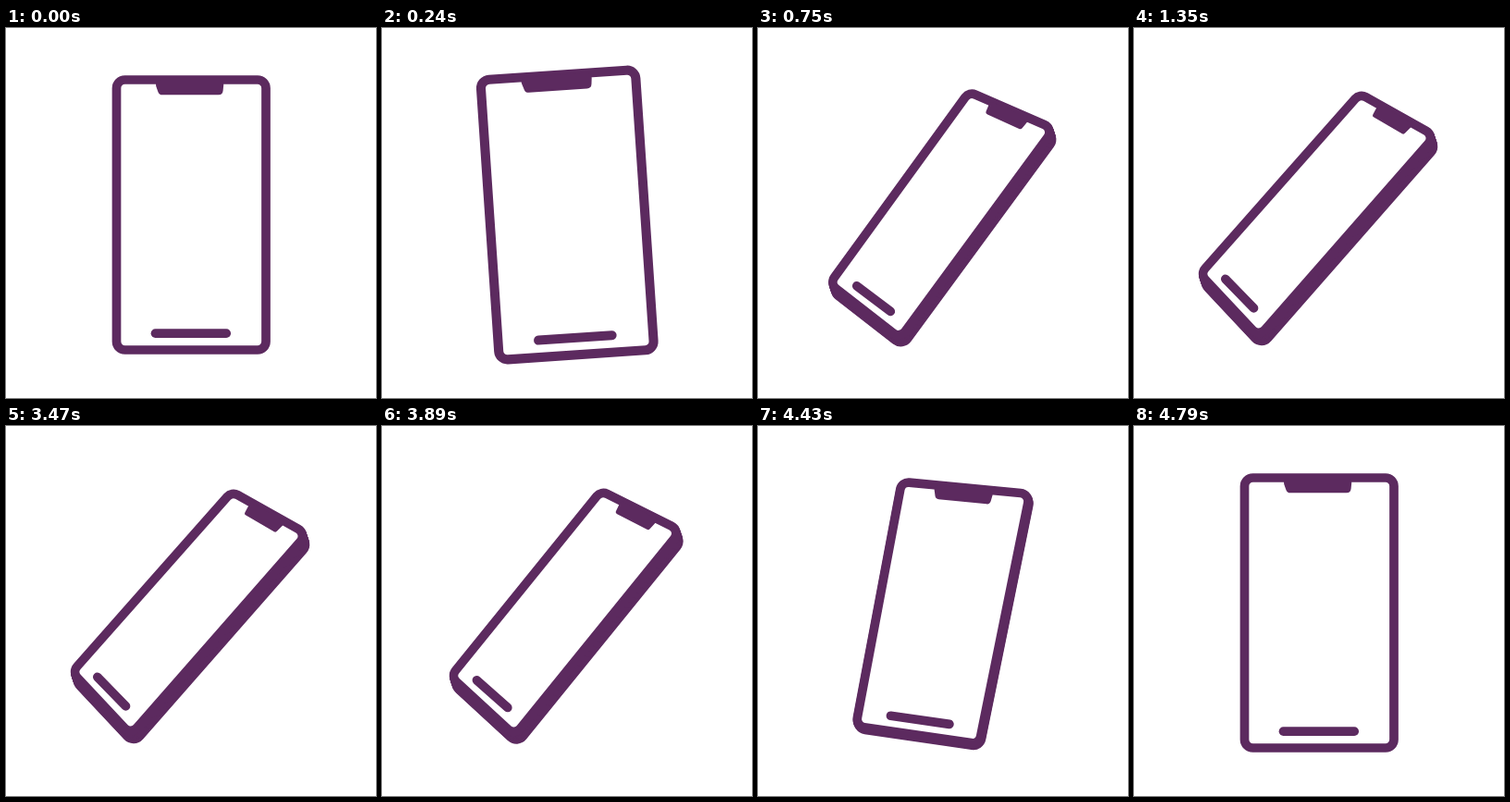
Write an HTML page with a canvas that moves like this. It is 400 by 400 pixels and loops after 5.82 s.

```html
<!DOCTYPE html>
<html lang="en">
<head>
<meta charset="utf-8">
<title>Tilting phone</title>
<style>
  html, body { margin: 0; width: 100%; height: 100%; overflow: hidden; background: #fff; }
  canvas { display: block; }
</style>
</head>
<body>
<canvas id="stage" width="400" height="400"></canvas>
<script>
const ctx = document.getElementById('stage').getContext('2d');
const PURPLE = '#5c2a5f';
const LOOP = 5820, TURN = 1350, BACK = 3440, STEP = 30;
const WINDUP = 150, SETTLE = 1290, DIP = 0.15;
const DEPTH = { x: 3, y: 9 };

// Upright body box, and where its corners go when fully tilted.
const body = { x: 119.5, y: 56, w: 161.5, h: 292 };
const tilted = [[244, 71], [325.5, 116.7], [135, 333.7], [71.5, 266]];

const lerp = (a, b, k) => a + (b - a) * k;
const mix = (p, q, k) => [lerp(p[0], q[0], k), lerp(p[1], q[1], k)];
const smooth = s => s * s * (3 - 2 * s);

// Maps u across and v down the screen face to the stage, for a tilt of 0 to 1.
function place(u, v, tilt) {
  const [a, b, c, d] = tilted;
  const end = mix(mix(a, b, u), mix(d, c, u), v);
  return mix([body.x + u * body.w, body.y + v * body.h], end, tilt);
}

// Cubic bezier easing (.26, 0, 0, 1), solved by bisection.
function ease(u) {
  let lo = 0, hi = 1;
  for (let i = 0; i < 24; i++) {
    const s = (lo + hi) / 2;
    if (0.78 * s * (1 - s) ** 2 + s ** 3 < u) lo = s; else hi = s;
  }
  return smooth(lo);
}

// Tilt amount: 0 upright, 1 fully tilted, negative while winding up.
function tiltAt(t) {
  if (t < WINDUP) return -DIP * smooth(t / WINDUP);
  return lerp(-DIP, 1, ease(Math.min(1, (t - WINDUP) / (SETTLE - WINDUP))));
}

// The way back is the way out in reverse.
function phase(t) {
  const snap = v => Math.floor(v / STEP) * STEP;
  return t < BACK ? Math.min(snap(t), TURN) : Math.max(0, TURN - snap(t - BACK));
}

function roundedPath(points, radius) {
  ctx.beginPath();
  ctx.moveTo(...mix(points[points.length - 1], points[0], 0.5));
  points.forEach((p, i) => ctx.arcTo(...p, ...points[(i + 1) % points.length], radius));
  ctx.closePath();
}

function draw(t) {
  const tilt = tiltAt(phase(t));
  const k = Math.max(0, tilt), windup = Math.max(0, -tilt / DIP);
  const at = (u, v) => place(u, v, k);

  ctx.setTransform(1, 0, 0, 1, 0, 0);
  ctx.fillStyle = '#fff';
  ctx.fillRect(0, 0, 400, 400);
  ctx.translate(200.3, 201.5);
  ctx.rotate(-windup * Math.PI / 30);
  ctx.scale(1 + 0.06 * windup, 1 + 0.06 * windup);
  ctx.translate(-200.3, -201.5);

  ctx.strokeStyle = PURPLE;
  ctx.lineWidth = 9.7;
  ctx.lineCap = ctx.lineJoin = 'round';

  // Sweep the outline from the back to the front to give the body its side.
  const face = [at(0, 0), at(1, 0), at(1, 1), at(0, 1)];
  const slices = Math.ceil(k * 10);
  for (let i = slices; i >= 0; i--) {
    const depth = slices ? k * i / slices : 0;
    roundedPath(face.map(([x, y]) => [x + DEPTH.x * depth, y + DEPTH.y * depth]), 9);
    if (i === 0) ctx.fill();
    ctx.stroke();
  }

  ctx.fillStyle = PURPLE;
  roundedPath([at(0.25, 0), at(0.72, 0), at(0.71, 0.056), at(0.285, 0.056)], lerp(5, 2.5, k));
  ctx.fill();

  ctx.beginPath();
  ctx.moveTo(...at(0.26, 0.939));
  ctx.lineTo(...at(0.735, 0.939));
  ctx.stroke();
}

const began = performance.now();
function tick() {
  draw((performance.now() - began) % LOOP);
  requestAnimationFrame(tick);
}
tick();
</script>
</body>
</html>
```
